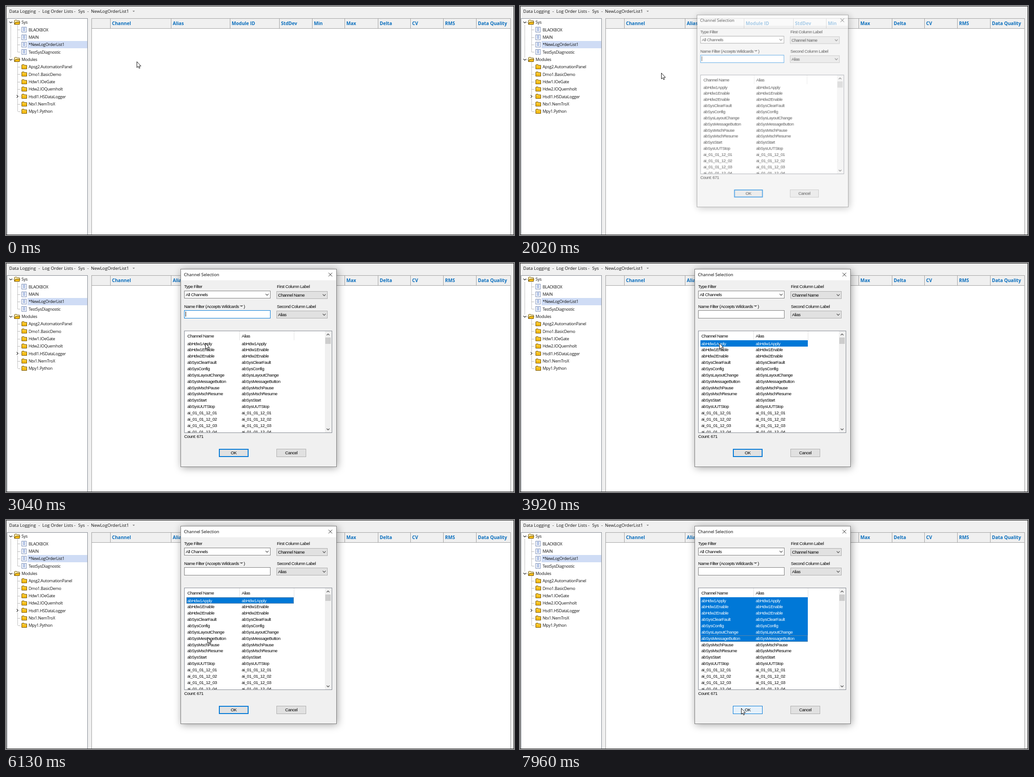
An HTML page with a canvas that plays this animation: 1112 px wide and 504 px high, repeating every 8 s.

```html
<!DOCTYPE html>
<html lang="en">
<head>
<meta charset="utf-8">
<title>Log order list</title>
<style>
html, body { margin: 0; width: 100%; height: 100%; overflow: hidden; background: #f0f0f0; }
canvas { display: block; }
</style>
</head>
<body>
<canvas id="stage" width="1112" height="504"></canvas>
<script>
const W = 1112, H = 504, LOOP = 8000;
const stage = document.getElementById('stage').getContext('2d');
const layer = document.createElement('canvas');
layer.width = W;
layer.height = H;
const dialogCtx = layer.getContext('2d');
let g = stage;

const UI = '"Open Sans", "Noto Sans", sans-serif';
const ARIAL = '"Liberation Sans", Arial, sans-serif';
const FONT = {
  crumb: ['9.6px ' + UI, 0],
  tree: ['9px ' + UI, -0.27],
  head: ['bold 10.1px ' + UI, 0],
  menu: ['9.3px ' + UI, 0],
  title: ['9.4px ' + UI, -0.05],
  form: ['9.5px ' + ARIAL, -0.44]
};
const BLUE = '#0078d7';

function rect(x, y, w, h, color) {
  g.fillStyle = color;
  g.fillRect(x, y, w, h);
}

function box(x, y, w, h, fill, edge, line = 1) {
  rect(x, y, w, h, edge);
  rect(x + line, y + line, w - 2 * line, h - 2 * line, fill);
}

// y is the vertical middle of the capitals
function text(s, x, y, style, color = '#000', align = 'left') {
  const [font, gap] = FONT[style];
  g.font = font;
  g.letterSpacing = gap + 'px';
  g.fillStyle = color;
  g.textAlign = align;
  g.fillText(s, x, Math.round(y + 3.3));
}

function path(points, color, width = 1) {
  g.beginPath();
  points.forEach(([x, y]) => g.lineTo(x, y));
  g.strokeStyle = color;
  g.lineWidth = width;
  g.stroke();
}

function chevron(x, y, r, color, turn = 0) {
  g.save();
  g.translate(x, y);
  g.rotate(turn);
  path([[-r, -r / 2], [0, r / 2], [r, -r / 2]], color, 1.1);
  g.restore();
}

function dotted(x1, y1, x2, y2, color = '#808080') {
  g.setLineDash([1, 1]);
  path([[x1, y1], [x2, y2]], color);
  g.setLineDash([]);
}

// Main window

const ROWS = [
  [0, 'Sys'], [1, 'BLACKBOX'], [1, 'MAIN'], [1, '*NewLogOrderList1'], [1, 'TestSysDiagnostic'],
  [0, 'Modules'], [2, 'Apsg2.AutomationPanel'], [2, 'Dmo1.BasicDemo'], [2, 'Hdw1.IOeGate'],
  [2, 'Hdw2.IOQuemholt'], [2, 'Hsdl1.HSDataLogger'], [2, 'Ntx1.NemTroX'], [2, 'Mpy1.Python']
];
const COLUMNS = [
  [187, ''], [228, 'Channel'], [361, 'Alias'], [490, 'Module ID'], [598, 'StdDev'], [670, 'Min'],
  [741, 'Max'], [814, 'Delta'], [885, 'CV'], [957, 'RMS'], [1029, 'Data Quality']
];

function shape(points, fill, edge) {
  g.beginPath();
  points.forEach(([x, y]) => g.lineTo(x, y));
  g.closePath();
  g.fillStyle = fill;
  g.fill();
  g.strokeStyle = edge;
  g.lineWidth = 1;
  g.stroke();
}

function folder(x, y, open) {
  const e = '#6b4d00';
  const back = [[x, y - 4], [x + 1, y - 5], [x + 5, y - 5], [x + 6, y - 3.5], [x + 11, y - 3.5], [x + 11, y + 4.5], [x, y + 4.5]];
  shape(back, open ? '#fff0b0' : '#f6bd16', e);
  if (open) shape([[x + 2.5, y - 0.5], [x + 12, y - 0.5], [x + 10.5, y + 4.5], [x, y + 4.5]], '#f6bd16', e);
  else rect(x + 0.5, y - 2.5, 10, 1, '#ffe27a');
}

function page(x, y) {
  box(x, y - 6, 11, 12, '#fff', '#7489b5');
  for (let i = 0; i < 4; i++) rect(x + 3, y - 4 + i * 2, 5, 1, '#6f8fd0');
}

function tree() {
  box(2, 27, 177, 477, '#fff', '#828790');
  dotted(10.5, 42, 10.5, 113);
  dotted(25.5, 42, 25.5, 101);
  dotted(25.5, 124, 25.5, 232);
  ROWS.forEach(([kind, label], i) => {
    const y = 36 + i * 16.33, m = Math.round(y);
    if (i === 3) rect(47, 77, 131, 16, '#cfdcf5');
    dotted(kind ? 26 : 14, m + 0.5, kind ? 32 : 18, m + 0.5);
    if (kind === 0) {
      chevron(10.5, m, 3, '#222');
      folder(18.5, m, true);
    } else if (kind === 1) page(34, m);
    else folder(34.5, m, false);
    if (i === 10) {
      rect(22, m - 4, 7, 8, '#fff');
      chevron(25, m, 3, '#222', -Math.PI / 2);
    }
    text(label, kind ? 49.5 : 34, y, 'tree', '#111');
  });
}

function table() {
  box(187, 27, 918, 477, '#fff', '#a0a0a0');
  rect(188, 28, 916, 21, '#f0f0f0');
  rect(187, 49, 918, 1, '#a0a0a0');
  COLUMNS.forEach(([x, name]) => {
    rect(x, 28, 1, 21, '#a0a0a0');
    text(name, x + 4, 38.5, 'head', '#0a6ebd');
  });
}

function mainWindow() {
  rect(0, 0, W, H, '#f0f0f0');
  [['Data Logging', 7], ['-', 71], ['Log Order Lists', 79.5], ['-', 149], ['Sys', 158],
   ['-', 178], ['NewLogOrderList1', 186]].forEach(([s, x]) => text(s, x, 11.7, 'crumb', '#111'));
  g.beginPath();
  g.moveTo(277, 10.5);
  g.lineTo(282, 10.5);
  g.lineTo(279.5, 13);
  g.fillStyle = '#777';
  g.fill();
  tree();
  table();
  g.strokeStyle = '#222';
  g.lineWidth = 1;
  g.strokeRect(0.5, 0.5, W - 1, H - 1);
}

// Context menu: label, middle, enabled, shortcut

const MENU = [
  ['Insert Before', 133, 0], ['Add to End', 152.7, 1], ['Delete', 172.3, 0], ['Move Up', 194.3, 1],
  ['Move Down', 214, 1], ['Copy', 236, 0, 'Ctrl+C'], ['Paste', 255.6, 0, 'Ctrl+V'],
  ['Undo', 277.6, 0, 'Ctrl+Z'], ['Redo', 297.2, 0, 'Ctrl+Y'], ['Show Customer Name', 319.2, 1]
];

function menu(hover) {
  rect(290, 126, 191, 207, '#c4c4c4');
  rect(290, 126, 190, 206, '#8c8c8c');
  box(286, 122, 193, 209, '#fff', '#c8c8c8');
  if (hover) rect(288, 143, 190, 19, '#dce8fb');
  [183, 225, 266, 308].forEach(y => rect(313, y, 165, 1, '#dcdcdc'));
  MENU.forEach(([label, y, on, key]) => {
    const color = on ? '#111' : '#737373';
    text(label, 313.5, y, 'menu', color);
    if (key) text(key, 429, y, 'menu', color);
  });
}

// Channel dialog

const CHANNELS = ('abHdw1Apply abHdw1Enable abHdw2Enable abSysClearFault abSysConfig abSysLayoutChange ' +
  'abSysMessageButton abSysMschPause abSysMschResume abSysStart abSysUUTStop ' +
  'ai_01_01_12_01 ai_01_01_12_02 ai_01_01_12_03 ai_01_01_12_04').split(' ');
const PITCH = 13.87;

function combo(x, y, w, label, flat) {
  box(x, y, w, 17, flat ? '#e1e1e1' : '#fff', flat ? '#adadad' : '#7a7a7a');
  text(label, x + 3.5, y + 8.7, 'form');
  chevron(x + w - 7.5, y + 8.5, 3.2, '#444');
}

function button(x, label, focused, hover) {
  box(x, 409, 65, 18, hover ? '#e5f1fb' : '#e1e1e1', focused ? BLUE : '#adadad', focused && !hover ? 2 : 1);
  text(label, x + 32.5, 418, 'form', '#000', 'center');
}

function list(s) {
  box(390, 149, 324, 225, '#fff', '#828790');
  if (s.headHover) rect(391, 150, 120, 20, '#d9ebf9');
  rect(511, 150, 1, 20, '#e2e2e2');
  rect(630, 150, 1, 20, '#e2e2e2');
  text('Channel Name', 397, 160.3, 'form');
  text('Alias', 516, 160.3, 'form');

  g.save();
  g.beginPath();
  g.rect(391, 150, 306, 223);
  g.clip();
  if (s.selected) rect(395, 170, 235, Math.ceil(s.selected * PITCH), BLUE);
  CHANNELS.forEach((name, i) => {
    const y = 177.2 + i * PITCH, color = i < s.selected ? '#fff' : '#000';
    text(name, 397, y, 'form', color);
    text(name, 516, y, 'form', color);
  });
  if (s.focusRow >= 0) {
    const y = Math.ceil(170 + s.focusRow * PITCH) + 0.5;
    g.setLineDash([1, 1]);
    g.strokeStyle = '#b59478';
    g.lineWidth = 1;
    g.strokeRect(395.5, y, 234, 13);
    g.setLineDash([]);
  }
  g.restore();

  rect(698, 150, 15, 223, '#f0f0f0');
  rect(699, 164, 12, 14, '#cdcdcd');
  chevron(705, 157.5, 3, '#444', Math.PI);
  chevron(705, 366, 3, '#444');
}

function dialog(s) {
  g.save();
  g.shadowColor = 'rgba(0,0,0,.36)';
  g.shadowBlur = 16;
  g.shadowOffsetX = 2;
  g.shadowOffsetY = 2;
  rect(382, 13, 342, 436, '#777');
  g.restore();
  box(382, 13, 342, 436, '#f0f0f0', '#777');
  rect(383, 14, 340, 24, '#fff');
  text('Channel Selection', 389.5, 26, 'title');
  path([[706, 21.5], [714, 29.5]], '#222');
  path([[714, 21.5], [706, 29.5]], '#222');

  text('Type Filter', 390, 52, 'form');
  text('First Column Label', 593, 52, 'form');
  text("Name Filter (Accepts Wildcards '*' )", 390, 95.7, 'form');
  text('Second Column Label', 593, 95.7, 'form');
  combo(390, 61, 189, 'All Channels', false);
  combo(592, 62, 112, 'Channel Name', true);
  combo(592, 105, 112, 'Alias', true);

  box(390, 104, 189, 18, '#fff', '#7a7a7a');
  g.globalAlpha = s.editFocus;
  box(390, 104, 189, 18, '#fff', BLUE);
  g.globalAlpha = 1;
  if (s.caret) rect(393, 107, 1, 11, '#000');

  list(s);
  text('Count: 671', 390, 382, 'form');
  button(466, 'OK', true, s.okHover);
  button(592, 'Cancel', false, false);
}

// Pointer

const MOVES = [
  [980, 1500, 8, 309, 147], [2340, 3040, 11, 436, 176], [5230, 6010, 12, 441, 256],
  [6070, 6130, 2, 441, 258], [6860, 7600, 12, 482, 407], [7690, 7960, 5, 484, 414]
];
const CLICKS = [[470, 650], [1580, 1940], [3490, 3650], [6340, 6460]];
const ARROW = [[0.5, 0.5], [0.5, 13.5], [3.3, 10.9], [5.3, 15.2], [7.3, 14.3], [5.4, 10.2], [9.4, 10.2]];

// Progress from 0 to 1 in n equal jumps, the first at a and the last at b
function steps(t, a, b, n) {
  if (t < a) return 0;
  return Math.min(n, Math.floor((t - a) / (b - a) * (n - 1) + 1e-6) + 1) / n;
}

function pointerAt(t) {
  let x = 286, y = 122;
  for (const [a, b, n, toX, toY] of MOVES) {
    const p = steps(t, a, b, n), e = p * p * (3 - 2 * p);
    x += (toX - x) * e;
    y += (toY - y) * e;
  }
  return [Math.round(x), Math.round(y)];
}

function pointer(x, y, pressed) {
  if (pressed) {
    g.beginPath();
    g.arc(x, y + 0.5, 9.7, 0, 7);
    g.fillStyle = 'rgba(247,238,50,.72)';
    g.fill();
  }
  g.save();
  g.translate(x, y);
  shape(ARROW, '#fff', '#111');
  g.restore();
}

function draw(t) {
  const [x, y] = pointerAt(t);
  g = stage;
  mainWindow();

  if (t >= 650 && t < 1790) {
    g.globalAlpha = t < 1740 ? 1 : 0.4;
    menu(y >= 143);
    g.globalAlpha = 1;
  }

  const open = steps(t, 1940, 2200, 5);
  if (open) {
    g = dialogCtx;
    g.clearRect(0, 0, W, H);
    dialog({
      selected: t < 3490 ? 0 : t < 6340 ? 1 : 7,
      focusRow: t < 5030 ? -1 : t < 6340 ? 0 : 6,
      editFocus: 1 - steps(t, 3560, 3920, 6),
      caret: t < 3490 && Math.floor((t - 1940) / 530) % 2 === 0,
      headHover: x >= 391 && x < 511 && y >= 150 && y < 170,
      okHover: x >= 466 && x < 531 && y >= 409
    });
    g = stage;
    const rest = (1 - open) ** 2, k = 1 - 0.08 * rest;
    g.save();
    g.globalAlpha = 1 - rest;
    g.translate(553, 231);
    g.scale(k, k);
    g.drawImage(layer, -553, -231);
    g.restore();
  }

  pointer(x, y, CLICKS.some(([a, b]) => t >= a && t < b));
}

const start = performance.now();
function tick() {
  draw((performance.now() - start) % LOOP);
  requestAnimationFrame(tick);
}
tick();
</script>
</body>
</html>
```
